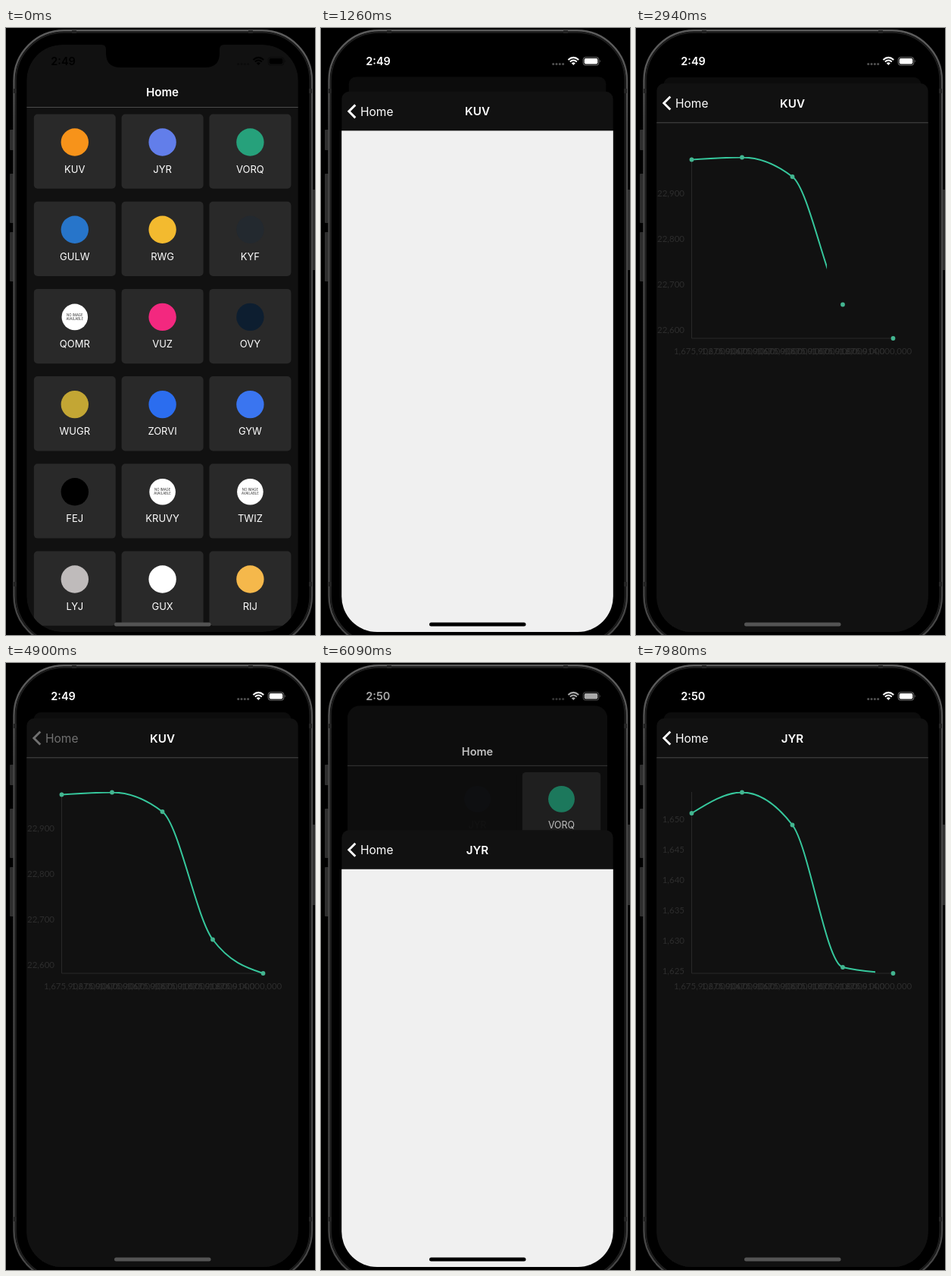
Recreate the animation shown at these times as an HTML page. Size 408 by 800 pixels, loop 8000 ms.

```html
<!DOCTYPE html>
<html lang="en">
<head>
<meta charset="utf-8">
<title>Coin prices</title>
<style>
  html, body { margin: 0; width: 100%; height: 100%; overflow: hidden; background: #000; }
  svg { display: block; width: 100%; height: 100%; font-family: Inter, "Open Sans", sans-serif; }
  .bold { font-weight: 600; }
  .mid { text-anchor: middle; }
  .axis { font: 11.5px Lato, "Open Sans", sans-serif; fill: #2d2d2d; }
</style>
</head>
<body>
<svg id="stage" viewBox="0 0 408 800"></svg>
<script>
const LOOP = 8000;
const OPEN_1 = 918, LOAD_1 = 1650, DRAW_1 = 1722;
const BACK = 4870, CLOSE = 4985;
const OPEN_2 = 5925.6, LOAD_2 = 6335, DRAW_2 = 6373;
const PRESS = [700, 5680];
const DRAW_MS = 2000, OMEGA = 0.018;

const coins = [
  ['KUV', '#f7931a'], ['JYR', '#627eea'], ['VORQ', '#26a17b'],
  ['GULW', '#2775ca'], ['RWG', '#f3ba2f'], ['KYF', '#23292f'],
  ['QOMR', null], ['VUZ', '#f3287f'], ['OVY', '#0d1e30'],
  ['WUGR', '#c3a634'], ['ZORVI', '#2b6def'], ['GYW', '#3a75f0'],
  ['FEJ', '#000'], ['KRUVY', null], ['TWIZ', null],
  ['LYJ', '#bfbbbb'], ['GUX', '#fff'], ['RIJ', '#f5b84b']
];

const xs = [73.5, 140, 206.5, 273, 339.5];
const charts = [
  { ys: [173.5, 170.5, 196, 364.5, 409], top: 22900, step: 100, count: 4, y0: 218, gap: 60 },
  { ys: [198, 170.5, 213.5, 401, 409], top: 1650, step: 5, count: 6, y0: 206, gap: 40 }
];

const range = n => Array.from({ length: n }, (_, i) => i);
const clamp = v => Math.max(0, Math.min(1, v));
const mix = (a, b, k) => a + (b - a) * k;
const comma = n => n.toLocaleString('en-US');
const rect = (x, y, w, h, r, fill, more = '') =>
  `<rect x="${x}" y="${y}" width="${w}" height="${h}" rx="${r}" fill="${fill}" ${more}/>`;
const text = (x, y, size, str, more = '') =>
  `<text x="${x}" y="${y}" font-size="${size}" ${more}>${str}</text>`;

function card([name, color], i) {
  const x = 36.8 + (i % 3) * 115.8, y = 113.5 + Math.floor(i / 3) * 115.2, cx = x + 54;
  const note = color ? '' :
    text(cx, y + 36, 4.3, 'NO IMAGE', 'class="mid" fill="#333"') +
    text(cx, y + 41, 4.3, 'AVAILABLE', 'class="mid" fill="#333"');
  return `<g id="card${i}">${rect(x, y, 108, 98.3, 5, '#292929')}
    <circle cx="${cx}" cy="${y + 37}" r="${color ? 18.2 : 17.3}" fill="${color || '#fff'}"/>${note}
    ${text(cx, y + 77, 13, name, 'class="mid" fill="#fff"')}</g>`;
}

// Monotone cubic through the data points
function curve(ys) {
  const h = xs[1] - xs[0], last = ys.length - 1;
  const s = range(last).map(i => (ys[i + 1] - ys[i]) / h);
  const m = ys.map((_, i) => {
    if (i === 0 || i === last) return 0;
    const a = s[i - 1], b = s[i];
    return (Math.sign(a) + Math.sign(b)) * Math.min(Math.abs(a), Math.abs(b), Math.abs(a + b) / 4);
  });
  m[0] = (3 * s[0] - m[1]) / 2;
  m[last] = (3 * s[last - 1] - m[last - 1]) / 2;
  return `M${xs[0]} ${ys[0]}` + s.map((_, i) =>
    `C${xs[i] + h / 3} ${ys[i] + m[i] * h / 3} ${xs[i + 1] - h / 3} ${ys[i + 1] - m[i + 1] * h / 3} ${xs[i + 1]} ${ys[i + 1]}`
  ).join('');
}

function chart(c, n) {
  const yLabels = range(c.count).map(i =>
    `<text class="axis" text-anchor="end" x="64" y="${c.y0 + 4.2 + i * c.gap}">${comma(c.top - i * c.step)}</text>`);
  const xLabels = range(7).map(i =>
    `<text class="axis mid" x="${98.5 + i * 36.2}" y="430">${comma(1675902e6 + i * 2e6)}</text>`);
  const dots = c.ys.map((y, i) => `<circle cx="${xs[i]}" cy="${y}" r="2.9" fill="#43b590"/>`);
  return `<g id="chart${n}">
    <path d="M73.5 170V409H340" fill="none" stroke="#282828"/>
    ${yLabels.join('')}${xLabels.join('')}
    <path d="${curve(c.ys)}" fill="none" stroke="#36c79c" stroke-width="2" clip-path="url(#reveal)"/>
    ${dots.join('')}</g>`;
}

const buttons = [[5, 134, 27], [5, 192, 65], [5, 269, 65], [404, 213, 106]]
  .map(([x, y, h]) => rect(x, y, 5, h, 1, '#2e2e2e')).join('');
const bands = [[87, 3, 6, 4], [320, 3, 6, 4], [10, 80, 4, 6], [400, 80, 4, 6], [10, 730, 4, 6], [400, 730, 4, 6]]
  .map(([x, y, w, h]) => rect(x, y, w, h, 0, '#242424')).join('');

const stage = document.getElementById('stage');
stage.innerHTML = `
  <defs>
    <linearGradient id="rail" gradientUnits="userSpaceOnUse" x1="0" y1="0" x2="0" y2="130">
      <stop offset=".2" stop-color="#5c5c5c"/><stop offset="1" stop-color="#464646"/>
    </linearGradient>
    <clipPath id="screen">${rect(27.2, 22, 358.6, 774, 47, '#000')}</clipPath>
    <clipPath id="window"><rect id="windowBox" x="27.2" y="22" width="358.6" height="774"/></clipPath>
    <clipPath id="reveal"><rect id="revealBox" x="73.5" y="170" height="239.5"/></clipPath>
  </defs>
  <rect width="408" height="800"/>
  ${buttons}
  ${rect(10.5, 3.3, 393.5, 811, 66, '#000', 'stroke="url(#rail)" stroke-width="2.4"')}
  ${rect(13, 5.8, 388.5, 806, 63.5, 'none', 'stroke="#1d1d1d" stroke-width="2"')}
  ${bands}
  <g clip-path="url(#screen)">
    <g id="home"><g clip-path="url(#window)">
      ${rect(27, 22, 359, 774, 0, '#111')}
      ${coins.map(card).join('')}
      ${rect(27, 104, 359, 1, 0, '#4c4c4c')}
      ${text(206.5, 90.3, 15.2, 'Home', 'class="mid bold" fill="#fff"')}
      <rect id="dim" x="27" y="22" width="359" height="774"/>
    </g></g>
    <path d="M126 22Q132 22 132 28V33Q132 52 151 52H263Q282 52 282 33V28Q282 22 288 22Z"/>
    <g id="sheet">
      ${rect(27.2, 73, 358.6, 800, 10, '#111')}
      <rect id="page" x="27" y="124.5" width="359" height="760"/>
      <rect id="rule" x="27" y="124.3" width="359" height="1" fill="#484848"/>
      <g id="back">
        <path d="M45.3 90.5L36.8 99L45.3 107.5" fill="none" stroke="#fff" stroke-width="2.9"/>
        ${text(52, 104.7, 15.5, 'Home', 'fill="#fff"')}
      </g>
      <text id="title" class="mid bold" x="206.5" y="104.6" font-size="15.2" fill="#fff"></text>
      ${charts.map(chart).join('')}
    </g>
    <rect id="bar" x="143" y="783.5" width="127.5" height="5" rx="2.5"/>
  </g>
  <g id="status">
    <text id="clock" class="bold" x="59.3" y="49" font-size="14.5"></text>
    <g opacity=".32">${range(4).map(i => `<circle cx="${306.7 + i * 4.3}" cy="47.4" r="1.5"/>`).join('')}</g>
    <path d="M333.3 49L330.7 46.3Q333.3 44.2 335.9 46.3Z"/>
    <path d="M328.8 44.5Q333.3 40.6 337.8 44.5M326.4 41.9Q333.3 35.8 340.2 41.9" fill="none" stroke="currentColor" stroke-width="2"/>
    <rect x="346.2" y="38.6" width="20.6" height="10.4" rx="3" fill="none" stroke="currentColor" stroke-opacity=".45"/>
    <rect x="347.7" y="40.1" width="17.6" height="7.4" rx="1.8"/>
    <path d="M368 42V45.6Q369.5 43.8 368 42Z" opacity=".5"/>
  </g>`;

const el = id => document.getElementById(id);
const set = (id, attrs) => {
  for (const k in attrs) el(id).setAttribute(k, attrs[k]);
};

const settle = ms => (1 + OMEGA * ms) * Math.exp(-OMEGA * ms);

function sheetAt(t) {
  if (t < OPEN_1) return 0;
  if (t < CLOSE) return 1 - settle(t - OPEN_1);
  if (t < OPEN_2) return settle(t - CLOSE);
  return 1 - settle(t - OPEN_2);
}

function statusAt(t) {
  if (t < CLOSE) return clamp((t - OPEN_1) / 250);
  if (t < OPEN_2) return 1 - clamp((t - 5470) / 120);
  return clamp((t - OPEN_2) / 250);
}

function cardOpacity(ms) {
  return ms < 150 ? mix(1, 0.05, clamp(ms / 150)) : 0.05 * clamp(1 - (ms - 150) / 600);
}

function render(t) {
  const p = sheetAt(t), second = t >= OPEN_2;
  const loaded = t >= (second ? LOAD_2 : LOAD_1);
  const sheetY = 727 * (1 - p), scale = mix(1, 0.947, p);

  set('home', { transform: `translate(206.5 ${mix(22, 65, p)}) scale(${scale}) translate(-206.5 -22)` });
  set('windowBox', { rx: mix(47, 10, p) });
  set('dim', { opacity: 0.32 * p });
  PRESS.forEach((at, i) => set('card' + i, { opacity: cardOpacity(t - at) }));

  set('sheet', { transform: `translate(0 ${sheetY})` });
  set('page', { fill: loaded ? '#111' : '#f0f0f0' });
  set('rule', { opacity: +loaded });
  set('back', { opacity: t >= BACK && !second ? 0.4 : 1 });
  el('title').textContent = coins[+second][0];
  charts.forEach((_, i) => set('chart' + i, { display: loaded && i === +second ? 'inline' : 'none' }));

  const k = clamp((t - (second ? DRAW_2 : DRAW_1)) / DRAW_MS);
  set('revealBox', { width: 267 * (1 - Math.cos(Math.PI * k)) / 2 });

  const level = Math.round(255 * statusAt(t));
  const ink = `rgb(${level},${level},${level})`;
  set('status', { fill: ink, color: ink });
  el('clock').textContent = t < 5250 ? '2:49' : '2:50';
  set('bar', { fill: !loaded && sheetY < 690 ? '#000' : '#545454' });
}

function tick() {
  render(performance.now() % LOOP);
  requestAnimationFrame(tick);
}
tick();
</script>
</body>
</html>
```
